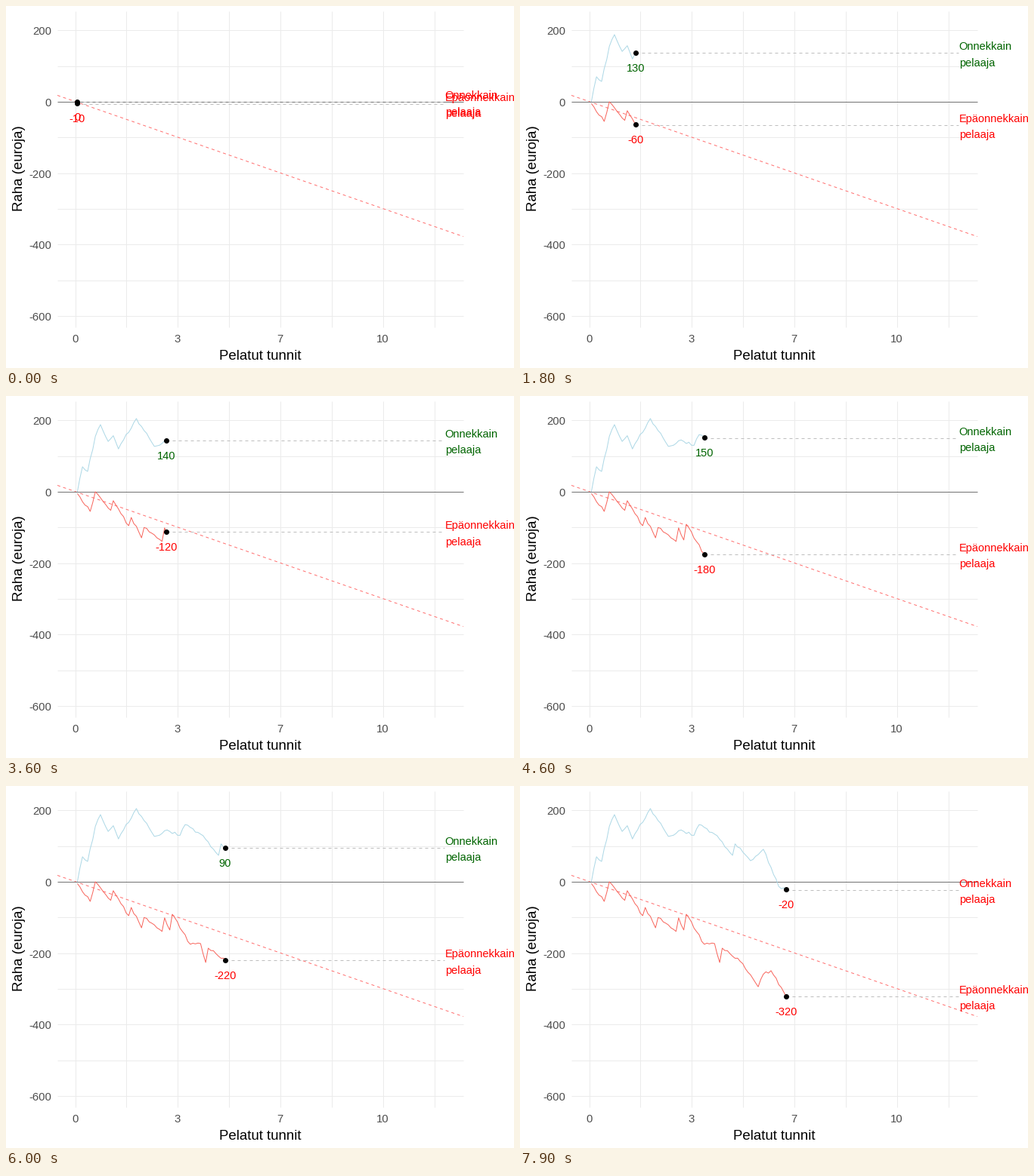
Write a matplotlib script that moves like this. It is 672x480 px and loops after 8000 ms.

```python
import numpy as np
import matplotlib.pyplot as plt
from matplotlib.animation import FuncAnimation

W, H, DPI = 672, 480, 96
PX = 72 / DPI                       # points per pixel
FRAMES, INTERVAL = 80, 100
LEFT, RIGHT, TOP, BOTTOM = 68, 605, 7, 426
STEPS, SHOWN = 144, 77              # five-minute steps: full axis, revealed
RATE = (STEPS - 1) / 149            # steps revealed per frame
STEP_PX, EURO_PX = 3.395, 0.4735
HOURLY_LOSS = 30
RED, GREEN, TICK = "#ff0000", "#006400", "#4d4d4d"

plt.rcParams["font.family"] = "Liberation Sans"

# Main turning points: (step, euros)
LUCKY = [(1, -1), (3, 69), (5, 56), (8, 154), (10, 187), (13, 140), (15, 156),
         (17, 119), (24, 204), (31, 126), (36, 144), (41, 129), (43, 159),
         (50, 128), (56, 73), (57, 105), (63, 58), (68, 90), (74, -14),
         (77, -24)]
UNLUCKY = [(1, -6), (6, -56), (8, -1), (14, -53), (15, -26), (21, -96),
           (22, -73), (26, -130), (27, -101), (34, -140), (35, -102),
           (37, -136), (38, -92), (45, -176), (49, -174), (51, -227),
           (52, -187), (59, -224), (66, -295), (68, -260), (71, -250),
           (77, -324)]
steps = np.arange(1, SHOWN + 1)
rng = np.random.default_rng(7)


def walk(turns):
    """Join the turning points, with small random wins and losses between."""
    at, euros = np.array(turns).T
    rough = rng.uniform(-4, 4, SHOWN)
    rough[at - 1] = 0
    return np.interp(steps, at, euros) + rough


def sx(step):
    return 91 + STEP_PX * step


def sy(euros):
    return 126.5 - EURO_PX * euros


def crisp(v):
    return np.floor(v) + 0.5


fig = plt.figure(figsize=(W / DPI, H / DPI), dpi=DPI, facecolor="white")
ax = fig.add_axes([0, 0, 1, 1])
ax.set_xlim(0, W)
ax.set_ylim(H, 0)
ax.axis("off")


def line(x, y, color, z, dashed=False):
    style = (0, (4, 4)) if dashed else "-"
    return ax.plot(x, y, color=color, lw=PX, ls=style, zorder=z,
                   solid_capstyle="butt", dash_capstyle="butt")[0]


def text(x, y, s, size, color, ha="center", **kw):
    return ax.text(x, y, s, fontsize=size * PX, color=color, ha=ha,
                   va="baseline", zorder=6, **kw)


# Grid and axis labels
for step in range(0, STEPS, 20):
    x = crisp(sx(step))
    line([x, x], [TOP, BOTTOM], "#ebebeb", 1)
    if step % 40 == 0:
        text(x, 446.5, f"{step / 12:.0f}", 14.93, TICK)
for euros in range(-600, 201, 100):
    y = crisp(sy(euros))
    line([LEFT, RIGHT], [y, y], "#ebebeb", 1)
    if euros % 200 == 0:
        text(60, y + 6.5, str(euros), 14.93, TICK, ha="right")
text(336, 469, "Pelatut tunnit", 18.67, "black")
text(22.5, 215.5, "Raha (euroja)", 18.67, "black", rotation=90,
     rotation_mode="anchor")

# Expected loss and break-even
ends = (np.array([LEFT, RIGHT]) - sx(0)) / STEP_PX
line([LEFT, RIGHT], sy(-HOURLY_LOSS * ends / 12), "#ff7070", 2, dashed=True)
line([LEFT, RIGHT], [sy(0)] * 2, "#737373", 2.5)


class Player:
    def __init__(self, name, turns, color):
        self.values = walk(turns)
        self.path = line([], [], color, 3)
        self.guide = line([], [], "#bebebe", 4, dashed=True)
        self.dot, = ax.plot([], [], "o", color="black", ms=7 * PX, mew=0,
                            zorder=5)
        self.total = text(0, 0, "", 14.6, RED)
        self.name = [text(sx(STEPS) + 0.8, 0, word, 14.6, RED, ha="left")
                     for word in (name, "pelaaja")]

    def update(self, pos):
        x, y = sx(pos), sy(np.interp(pos, steps, self.values))
        past = steps < pos
        self.path.set_data(np.append(sx(steps[past]), x),
                           np.append(sy(self.values[past]), y))
        self.guide.set_data([x, sx(STEPS)], [crisp(y)] * 2)
        self.dot.set_data([x], [y])

        nearest = self.values[round(pos) - 1]
        color = GREEN if nearest > 0 else RED
        self.total.set(text=str(10 * int(round(nearest / 10))),
                       position=(x, y + 25), color=color)
        for word, dy in zip(self.name, (-3.5, 17.7)):
            word.set(y=y + dy, color=color)


players = [Player("Onnekkain", LUCKY, "#add8e6"),
           Player("Epäonnekkain", UNLUCKY, "#f8665d")]


def update(frame):
    for player in players:
        player.update(1 + RATE * frame)
    return []


anim = FuncAnimation(fig, update, frames=FRAMES, interval=INTERVAL,
                     repeat=True, repeat_delay=0, blit=False)
plt.show()
```
